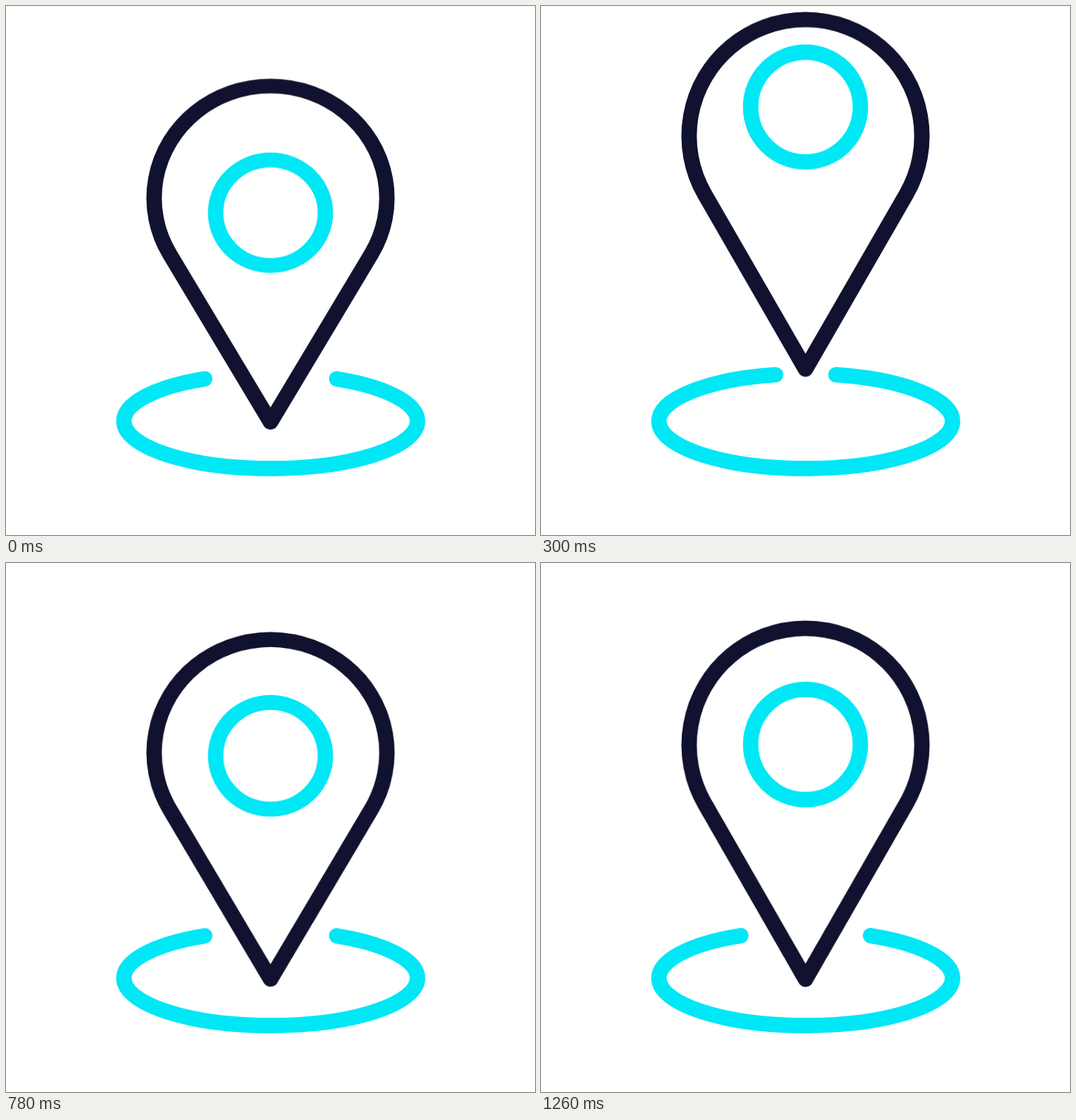
Write an HTML page without scripts that moves like this. It is 748 px wide and 748 px high and loops after 1290 ms.

```html
<!DOCTYPE html>
<html lang="en">
<head>
<meta charset="utf-8">
<title>Bouncing map pin</title>
<style>
  :root { --navy: #11122f; --cyan: #00e7f6; }
  html, body { margin: 0; width: 100%; height: 100%; overflow: hidden; background: #fff; }
  svg { display: block; width: 100%; height: 100%; }
  path, circle { fill: none; stroke-width: 21.8; stroke-linecap: round; stroke-linejoin: round; }
  .pin { stroke: var(--navy); }
  .eye, .ring { stroke: var(--cyan); }

  .jump, .stretch, .eye, .ring { animation: 1290ms cubic-bezier(.37, 0, .63, 1) infinite; }
  .jump { animation-name: jump; }
  .stretch { animation-name: stretch; transform-origin: 374px 588.5px; }
  .eye { animation-name: follow; }
  .ring { animation-name: gap; }

  /* quadratic ease-out going up, quadratic ease-in coming down */
  @keyframes jump {
    0%, 4.65% {
      transform: translateY(0);
      animation-timing-function: cubic-bezier(.333, .667, .667, 1);
    }
    28.14% {
      transform: translateY(-78.4px);
      animation-timing-function: cubic-bezier(.333, 0, .667, .333);
    }
    51.7%, 100% { transform: translateY(0); }
  }
  /* squash and stretch about the tip */
  @keyframes stretch {
    0% {
      transform: scaleY(.963);
      animation-timing-function: cubic-bezier(.333, .667, .667, 1);
    }
    4.65% { transform: scaleY(.927); }
    23.26%, 30.23% { transform: scaleY(1); }
    47.29% { transform: scaleY(1.068); }
    66.67% { transform: scaleY(.944); }
    86.05% { transform: scaleY(1.021); }
    100% { transform: scaleY(1.003); }
  }
  @keyframes follow {
    0% {
      transform: translateY(22.3px);
      animation-timing-function: cubic-bezier(.333, .667, .667, 1);
    }
    4.65% { transform: translateY(29px); }
    25.58%, 27.13% { transform: translateY(-42px); }
    67.05% { transform: translateY(8.7px); }
    79.07%, 100% { transform: translateY(0); }
  }
  /* the ring closes behind the pin while it is in the air */
  @keyframes gap {
    0%, 5.74% {
      stroke-dasharray: 733.2 186.8; stroke-dashoffset: -93.4;
      animation-timing-function: cubic-bezier(.333, .667, .667, 1);
    }
    29.46% {
      stroke-dasharray: 841.8 78.2; stroke-dashoffset: -39.1;
      animation-timing-function: cubic-bezier(.333, 0, .667, .333);
    }
    53.18%, 60.47% { stroke-dasharray: 733.2 186.8; stroke-dashoffset: -93.4; }
    79.07%, 100% { stroke-dasharray: 736.4 183.6; stroke-dashoffset: -91.8; }
  }
</style>
</head>
<body>
<svg viewBox="0 0 748 748">
  <path class="ring" pathLength="920" d="M374.3 520a207.6 67 0 0 1 0 134a207.6 67 0 0 1 0 -134"/>
  <g class="jump">
    <g class="stretch">
      <path class="pin" d="M374 588.5L231.5 341.3A164.6 164.6 0 1 1 516.5 341.3Z"/>
      <circle class="eye" cx="374" cy="258" r="77.6"/>
    </g>
  </g>
</svg>
</body>
</html>
```
